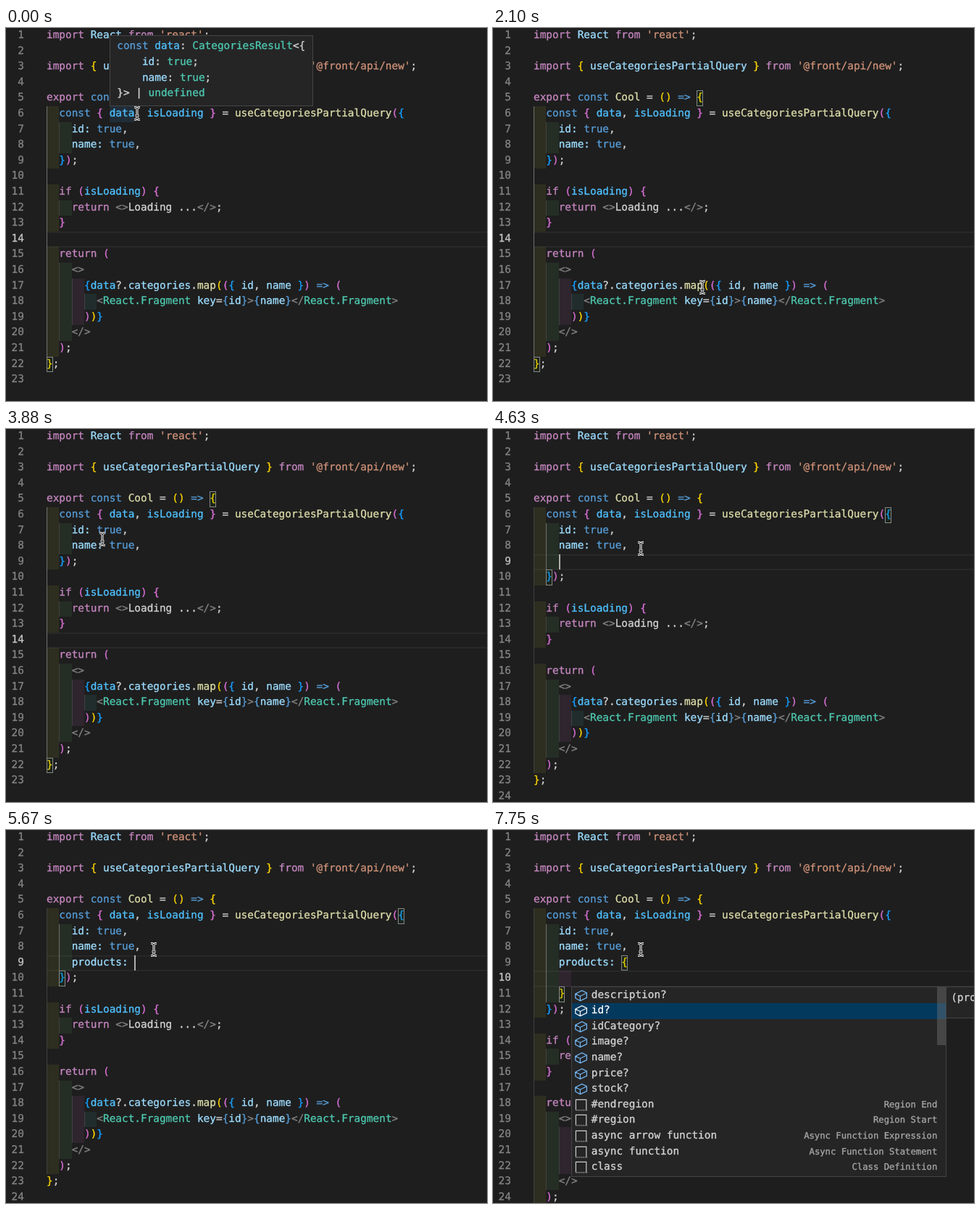
Animation, 664 px wide and 515 px high, one loop 8000 ms. Source, as an HTML page:

```html
<!DOCTYPE html>
<html lang="en">
<head>
<meta charset="utf-8">
<title>Typed query hints</title>
<style>
html, body { margin: 0; width: 100%; height: 100%; overflow: hidden; background: #1e1e1e; }
#stage { position: relative; width: 664px; height: 515px; overflow: hidden; background: #1e1e1e;
  font: 14.4px/21.6px 'DejaVu Sans Mono', monospace; color: #d4d4d4; -webkit-text-stroke-width: .3px;
  white-space: pre; text-rendering: geometricPrecision; font-variant-ligatures: none; }
#stage div { position: absolute; box-sizing: border-box; }
.panel { background: #252526; border: 1px solid #454545; overflow: hidden; }
.detail { font-size: 12.24px; opacity: .75; text-align: right; }
.docs { font: 14.4px/21.6px Inter, sans-serif; white-space: normal; border-top: 1px solid #454545; }
svg { position: absolute; fill: none; overflow: visible; }
</style>
</head>
<body>
<div id="stage"></div>
<script>
const LOOP = 8000, CHAR = 8.669, ROW = 21.6;
const stage = document.getElementById('stage');
const X = col => 56 + col * CHAR;
const Y = line => (line - 1) * ROW;

// In marked-up text, "~" and a letter switch to one of these colours.
const INK = {
  k: '#c586c0', c: '#569cd6', v: '#9cdcfe', n: '#4fc1ff', f: '#dcdcaa', t: '#4ec9b0',
  s: '#ce9178', d: '#d4d4d4', g: '#808080', l: '#c8c8c8', y: '#ffd700', p: '#da70d6', b: '#179fff'
};
const TINTS = ['255,255,64', '127,255,127', '255,127,255', '79,236,236'];

const HEAD = [
  "~kimport ~vReact ~kfrom ~s'react'~d;",
  "",
  "~kimport ~y{ ~vuseCategoriesPartialQuery ~y} ~kfrom ~s'@front/api/new'~d;",
  "",
  "~kexport ~cconst ~fCool ~d= ~y() ~c=> ~y{",
  "  ~cconst ~p{ ~ndata~d, ~nisLoading ~p} ~d= ~fuseCategoriesPartialQuery~p(~b{",
  "    ~vid: ~ctrue~d,",
  "    ~vname: ~ctrue~d,"
];
const TAIL = [
  "  ~b}~p)~d;",
  "",
  "  ~kif ~p(~nisLoading~p) {",
  "    ~kreturn ~g<>~dLoading ...~g</>~d;",
  "  ~p}",
  "",
  "  ~kreturn ~p(",
  "    ~g<>",
  "      ~b{~ndata~d?.~vcategories~d.~fmap~y(~p(~b{ ~vid~d, ~vname ~b}~p) ~c=> ~p(",
  "        ~g<~tReact.Fragment ~vkey~d=~c{~vid~c}~g>~c{~vname~c}~g</~tReact.Fragment~g>",
  "      ~p)~y)~b}",
  "    ~g</>",
  "  ~p)~d;",
  "~y}~d;"
];

const shape = s => [`    ~${s}id: ~vstring~d;`, `    ~${s}name: ~vstring~d;`];
const HOVERS = {
  data: { col: 10, line: 6, chars: 30, text: [
    "~cconst ~ndata~d: ~tCategoriesResult~d<{", "    ~vid~d: ~ttrue~d;", "    ~vname~d: ~ttrue~d;",
    "~d}> | ~tundefined"] },
  loading: { col: 16, line: 6, chars: 24, text: ["~cconst ~nisLoading~d: ~tboolean"] },
  categories: { col: 13, line: 17, chars: 24, text: [
    "~d(~vproperty~d) ~lcategories~d: {", ...shape('l'), "~d}[] | ~cundefined"] },
  map: { col: 24, line: 17, chars: 52, height: 303, text: [
    "~d(~vmethod~d) ~vArray~d<{", ...shape('l'),
    "~d}>.~fmap~d<~vJSX~d.~vElement~d>(~vcallbackfn~d: (~vvalue~d: {", ...shape('l'),
    "~d}, ~vindex~d: ~vnumber~d, ~varray~d: {", ...shape('l'),
    "~d}[]) ~c=> ~vJSX~d.~vElement~d, ~vthisArg~d?: ~vany~d): ~vJSX~d.~vElement~d[]"],
    docs: 'Calls a defined callback function on each element of an array, and returns an array that contains the results.' }
};

const SNIPPETS = [
  ['#endregion', 'Region End'], ['#region', 'Region Start'],
  ['async arrow function', 'Async Function Expression'],
  ['async function', 'Async Function Statement'], ['class', 'Class Definition'],
  ['ctor', 'Constructor'], ['dowhile', 'Do-While Statement'], ['error', 'Log error to console'],
  ['for', 'For Loop'], ['forawaitof', 'For-Await-Of Loop'], ['foreach =>', 'For-Each Loop using =>']
];
const FIELDS = ['description', 'id', 'idCategory', 'image', 'name', 'price', 'stock'];
const fieldItems = names => names.map(name => [name + '?']);
const outer = { col: 4, line: 10, items: [...fieldItems(['products']), ...SNIPPETS], pick: 0, thumb: 95 };
const outerInfo = ['(property) products?: {',
  ...['id', 'idCategory', 'name', 'description', 'image', 'price', 'stock'].map(f => `    ${f}?: boolean;`),
  '} | undefined'];
const inner = { col: 6, line: 11, items: [...fieldItems(FIELDS), ...SNIPPETS.slice(0, 6)], thumb: 80 };

const key = "    ~vproducts";
const block = [key + ": ~y{", "      ", "    ~y}"];

// Each step changes part of the state from its time on.
const STEPS = [
  [0, { mouse: [181, 118], caret: 0, at: [14, 0], added: [], guide: [0, 6, 21],
        match: [[5, 26], [22, 0]], hover: 'data', alpha: 1, word: [6, 10, 4], menu: null }],
  [150, { mouse: [202, 118], word: null }],
  [300, { mouse: [216, 118], caret: 1 }],
  [600, { alpha: .5 }],
  [750, { hover: null, caret: 0 }],
  [1200, { hover: 'loading', alpha: .5, word: [6, 16, 9] }],
  [1350, { alpha: 1, caret: 1 }],
  [1650, { mouse: [222, 142], word: null }],
  [1800, { mouse: [245, 220], caret: 0 }],
  [1950, { mouse: [275, 310], alpha: .5 }],
  [2100, { mouse: [289, 358], hover: null }],
  [2250, { hover: 'map', alpha: .4, caret: 1, word: [17, 24, 3] }],
  [2400, { alpha: 1 }],
  [2540, { mouse: [245, 355], hover: null, word: [17, 13, 10] }],
  [2690, { mouse: [233, 354], hover: 'categories', alpha: .45 }],
  [2840, { alpha: 1, caret: 0 }],
  [3290, { caret: 1 }],
  [3730, { mouse: [168, 235], alpha: .5, caret: 0, word: null }],
  [3880, { mouse: [133, 152], hover: null }],
  [4030, { mouse: [180, 160] }],
  [4180, { mouse: [204, 165] }],
  [4330, { caret: 1, at: [8, 15], guide: [2, 7, 8], match: [[6, 56], [9, 2]] }],
  [4630, { added: ["    "], at: [9, 4], guide: [2, 7, 9], match: [[6, 56], [10, 2]] }],
  [4930, { menu: outer }],
  [5070, { menu: { ...outer, info: outerInfo }, caret: 0 }],
  [5370, { menu: null, added: [key], at: [9, 12], caret: 1 }],
  [5520, { added: [key + ":"], at: [9, 13] }],
  [5670, { added: [key + ": "], at: [9, 14] }],
  [5960, { added: [key + ": ~y{}"], at: [9, 15], match: [[9, 14], [9, 15]] }],
  [6260, { added: block, at: [10, 6], guide: [2, 7, 11], match: [[9, 14], [12, 2]] }],
  [6560, { match: [[9, 14], [11, 4]] }],
  [6710, { caret: 0 }],
  [7150, { caret: 1, menu: { ...inner, pick: 0, info: ['(property) description?: boolean |', 'undefined'] } }],
  [7750, { caret: 0, menu: { ...inner, pick: 1, info: ['(property) id?: boolean | undefined'] } }]
];
let last = {};
const STATES = STEPS.map(([time, change]) => ({ time, state: last = { ...last, ...change } }));

const escape = s => s.replace(/&/g, '&amp;').replace(/</g, '&lt;');
const paint = s => s.split('~').map((part, i) =>
  i ? `<span style="color:${INK[part[0]]}">${escape(part.slice(1))}</span>` : part).join('');
const box = (x, y, w, h, css = '', content = '', cls = '') =>
  `<div class="${cls}" style="left:${x}px;top:${y}px;width:${w}px;height:${h}px;${css}">${content}</div>`;
const label = (x, y, content, css = '') => box(x, y, 900, ROW, css, content);

// Blank lines take their guides from the code around them.
function guideCount(text, line, indent) {
  if (text.trim()) return indent / 2;
  if (line < 6) return 0;
  return indent ? 2 : 1;
}

function drawLine(text, line, state) {
  const indent = text.search(/~|$/);
  const guides = guideCount(text, line, indent);
  const [col, from, to] = state.guide;
  let out = '';
  for (let i = 0; i < indent / 2; i++)
    out += box(X(i * 2), Y(line), 2 * CHAR, ROW, `background:rgba(${TINTS[i]},.07)`);
  for (let i = 0; i < guides; i++) {
    const active = col === i * 2 && line >= from && line <= to;
    out += box(Math.round(X(i * 2)), Y(line), 1, ROW, `background:${active ? '#707070' : '#404040'}`);
  }
  return out + drawNumber(line, line === state.at[0]) + label(X(0), Y(line), paint(text));
}

function drawNumber(line, active) {
  return box(0, Y(line), 24.8, ROW, `text-align:right;color:${active ? '#c6c6c6' : '#858585'}`, line);
}

function drawHover({ col, line, chars, text, height, docs }, alpha) {
  const h = height || text.length * ROW + 12;
  const lines = text.map((t, i) => label(9.6, 4.8 + i * ROW, paint(t))).join('');
  const notes = docs ? box(0, 10 + text.length * ROW, 470, 80, 'padding:5px 9.6px', docs, 'docs') : '';
  return box(X(col), Y(line) - h, chars * CHAR + 21.6, h, `opacity:${alpha}`, lines + notes, 'panel');
}

function drawIcon(x, y, field, color) {
  const path = field
    ? '<path d="M1.5 6 9 2.3 14.5 5v5.5L7 14 1.5 11zM1.5 6 7 8.7 14.5 5M7 8.7V14"/>'
    : '<path d="M2 13.5V2h12v11.5"/><path d="M2 14h13" stroke-dasharray="1 1"/>';
  return `<svg style="left:${x}px;top:${y}px" width="19.2" height="19.2" viewBox="0 0 16 16" stroke="${color}">${path}</svg>`;
}

function drawMenu({ col, line, items, pick, thumb, info }) {
  const x = X(col), y = Y(line);
  const rows = items.map(([name, detail], i) => {
    const top = 0.5 + i * ROW, chosen = i === pick;
    return (chosen ? box(0, top, 516, ROW, 'background:#04395e') : '') +
      drawIcon(3, top + 1, !detail, chosen ? '#fff' : detail ? '#ccc' : '#75beff') +
      label(26.8, top, escape(name), chosen ? 'color:#fff' : '') +
      (detail ? box(200, top, 304.3, ROW, '', detail, 'detail') : '');
  }).join('');
  const bar = box(503.6, 0, 13, thumb, 'background:rgba(121,121,121,.4)');
  const side = info ? box(x + 517, y, 400, info.length * ROW + 22, '',
    info.map((t, i) => label(6.2, 5.4 + i * ROW, t)).join(''), 'panel') : '';
  return side + box(x, y, 518, 263, '', rows + bar, 'panel');
}

function drawMouse([x, y]) {
  const path = 'M-4-8.5Q0-8.5 0-6Q0-8.5 4-8.5M0-6V6M-4 8.5Q0 8.5 0 6Q0 8.5 4 8.5M-2.5 3H2.5';
  return `<svg style="left:${x}px;top:${y}px" width="1" height="1">` +
    `<path d="${path}" stroke="#fff" stroke-width="3"/><path d="${path}" stroke="#111" stroke-width="1"/></svg>`;
}

function draw(state) {
  const [line, col] = state.at;
  const lines = [...HEAD, ...state.added, ...TAIL];
  let out = box(56, Y(line), 620, ROW + 1, 'border:2px solid #282828;border-width:2px 0');
  if (state.word) {
    const [row, start, length] = state.word;
    out += box(X(start), Y(row), length * CHAR, ROW, 'background:rgba(38,79,120,.3)');
  }
  out += lines.map((text, i) => drawLine(text, i + 1, state)).join('');
  out += drawNumber(lines.length + 1, false);
  out += state.match.map(([row, at]) =>
    box(X(at), Y(row), CHAR, ROW, 'border:1px solid #888;background:rgba(0,100,0,.1)')).join('');
  if (state.caret) out += box(X(col), Y(line), 2, ROW, 'background:#aeafad');
  if (state.hover) out += drawHover(HOVERS[state.hover], state.alpha);
  if (state.menu) out += drawMenu(state.menu);
  stage.innerHTML = out + drawMouse(state.mouse);
}

let shown = -1;
const start = performance.now();
function tick() {
  const time = (performance.now() - start) % LOOP;
  const index = STATES.filter(s => s.time <= time).length - 1;
  if (index !== shown) draw(STATES[shown = index].state);
  requestAnimationFrame(tick);
}
tick();
</script>
</body>
</html>
```
